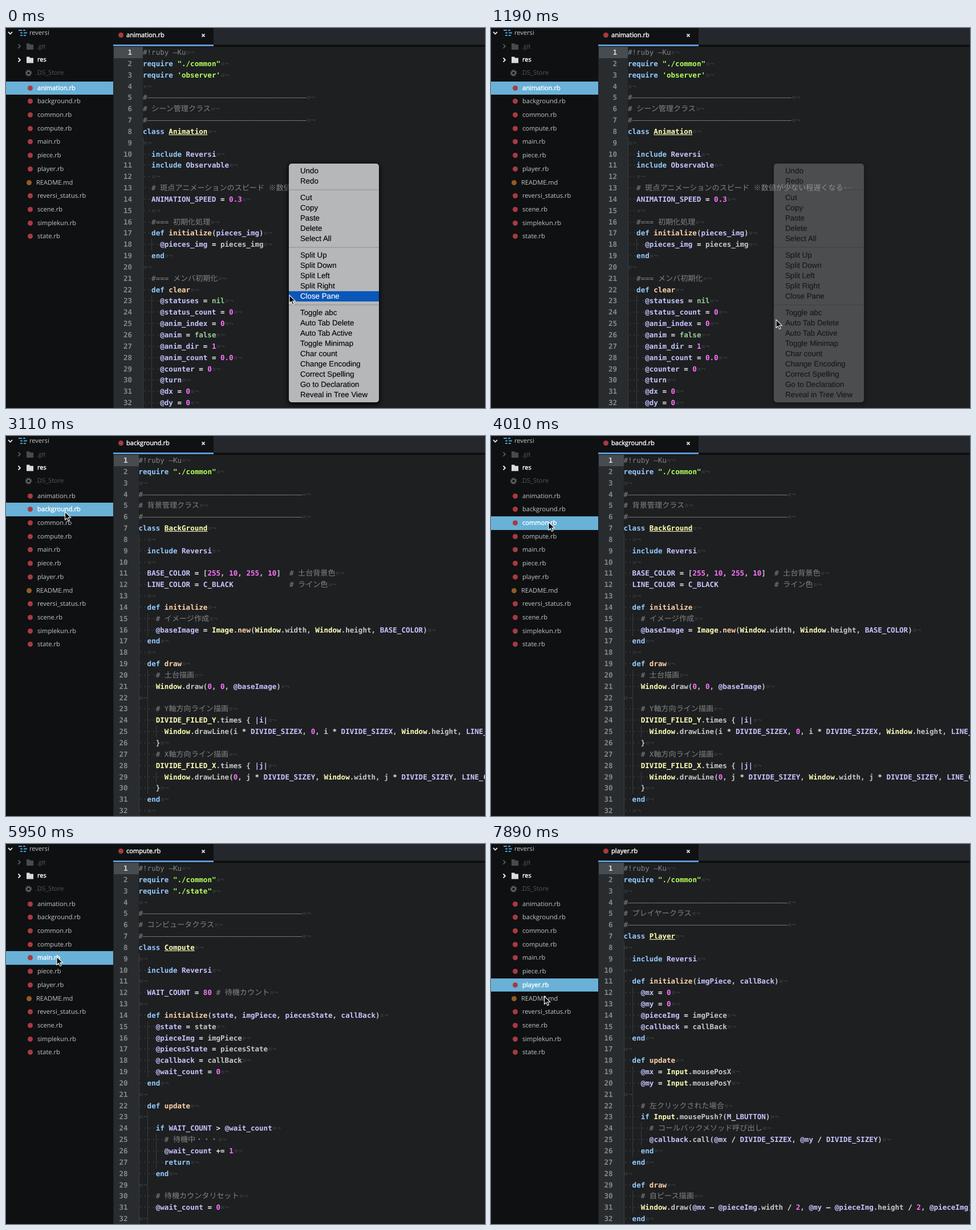
An HTML page that plays this animation: 840x667 px, repeating every 8 s.

```html
<!DOCTYPE html>
<html lang="ja">
<head>
<meta charset="utf-8">
<title>reversi</title>
<style>
html, body { margin: 0; width: 100%; height: 100%; overflow: hidden; background: #1d1f21; text-rendering: geometricPrecision; }
#stage { position: relative; width: 840px; height: 667px; overflow: hidden; font: 11.1px/24px "Open Sans", "Noto Sans", sans-serif; color: #c4c6c8; }
#stage div, #stage svg { position: absolute; }
#tree { left: 0; top: 0; width: 188px; height: 667px; background: #0f1012; }
#highlight { left: 0; width: 188px; height: 23.5px; background: #69b1d6; }
.label { white-space: pre; }
.strong { color: #fff; -webkit-text-stroke: .4px #fff; }
.dim { color: #54575a; }
#bar { left: 188px; top: 0; width: 652px; height: 33px; background: linear-gradient(#24282c 29px, #0c0d0e 30px); }
#tab { left: 0; top: 0; width: 176px; height: 29px; background: #101113; border-bottom: 3.5px solid #5b9bd5; }
.dot { width: 9px; height: 9px; border-radius: 50%; background: #a83a40; }
.page { left: 0; top: 0; width: 840px; height: 667px; }
.gutter { left: 189px; top: 33px; height: 634px; background: #282c2f; }
.current { left: 0; top: 0; width: 100%; height: 20px; background: #474c50; }
.row { height: 19.84px; white-space: pre; font: bold 12.55px/19.84px "DejaVu Sans Mono", monospace; color: #c5c8c6; }
.row span, .row s { position: relative; }
.row .num { position: absolute; right: 100%; margin-right: 19px; color: #85898c; }
.first .num { color: #d5d8da; }
.guide { left: 0; top: 0; height: 20px; background: repeating-linear-gradient(90deg, #3a3d40 0 1px, transparent 1px 15.11px); }
.row s { color: #404346; font-weight: normal; text-decoration: none; }
.row i { font: 13.1px/0 "Noto Sans CJK JP", "Noto Sans CJK", sans-serif; }
.comment { color: #838383; font-weight: normal; }
.string { color: #b4ff5c; }
.key { color: #96cbfe; }
.bool { color: #99cc99; }
.digits { color: #ff73fd; }
.name { color: #ffffb6; text-decoration: underline; }
.func { color: #ffd2a7; }
.type { color: #ffffb6; }
.var { color: #c6c5fe; }
.op { color: #ededed; }
.fold { left: 228.5px; width: 3.5px; height: 3.5px; border: solid #85898c; border-width: 0 1.5px 1.5px 0; transform: rotate(45deg); }
#caret { left: 240px; top: 33px; width: 1px; height: 20px; background: #fff; }
#menu { left: 496px; top: 238px; width: 158px; height: 419px; border-radius: 5px; background: #b5b7b9; box-shadow: 0 2px 6px 2px #08090a; font: 13.3px/18px "Liberation Sans", Arial, sans-serif; color: #050505; -webkit-text-stroke: .15px; }
#menu div { left: 0; width: 138px; height: 18px; padding-left: 20px; white-space: pre; }
#menu .line { width: 158px; height: 2px; padding: 0; background: #a0a2a4; }
#menu .active { background: #0957b9; color: #fff; }
</style>
</head>
<body>
<div id="stage">
  <div id="tree">
    <div id="highlight"></div>
    <svg width="188" height="90" fill="none" stroke-width="1.8">
      <path d="M4 7l3.5 3.5L11 7" stroke="#ddd"/>
      <path d="M22 4h6m2 0h4M25 8.500h4m2 0h6M25 13h4m2 0h4" stroke="#4d9dcc"/>
      <path d="M21.500 28.500l3.500 3.500l-3.500 3.500" stroke="#54575a"/>
      <path d="M21.500 52.500l3.500 3.500l-3.500 3.500" stroke="#eee"/>
      <path d="M36 27h5l1.500 2H48v9H36z" fill="#484b4e"/>
      <path d="M36 50.500h5l1.500 2H48v9H36z" fill="#d8dadc"/>
      <circle cx="39.500" cy="79" r="3.300" stroke="#5a5d60" stroke-width="2.400"/>
      <circle cx="39.500" cy="79" r="5" stroke="#5a5d60" stroke-dasharray="2 1.930"/>
    </svg>
    <div class="label" style="left:41px;top:-3px">reversi</div>
    <div class="label dim" style="left:54px;top:20.5px">.git</div>
    <div class="label strong" style="left:55px;top:44px">res</div>
    <div class="label dim" style="left:52px;top:66.5px">.DS_Store</div>
  </div>
  <div id="bar"><div id="tab">
    <div class="dot" style="left:9px;top:8px"></div>
    <div id="title" class="label strong" style="left:23px;top:.5px"></div>
    <svg style="left:154px;top:9px" width="8" height="8"><path d="M1.500 1.500l5 5m0-5l-5 5" stroke="#d0d2d4" stroke-width="1.800"/></svg>
  </div></div>
  <div id="pages"></div>
  <div id="folds"></div>
  <div id="caret"></div>
  <div id="menu"></div>
  <svg id="pointer" width="14" height="20" style="left:0;top:0"><path d="M1 1V15.200L4.300 12.100L6.500 17.400L8.900 16.400L6.700 11.200H11.200Z" fill="#000" stroke="#fff" stroke-width="1.100"/></svg>
</div>
<script>
const $ = id => document.getElementById(id);
const ROW = 19.84, CELL = 7.555, FILE = 23.7, FILES_TOP = 93.6;

const files = ['animation.rb', 'background.rb', 'common.rb', 'compute.rb', 'main.rb', 'piece.rb',
  'player.rb', 'README.md', 'reversi_status.rb', 'scene.rb', 'simplekun.rb', 'state.rb'];

// "#--" stands for a full-width comment rule.
const pages = [
  { file: 0, code: `#!ruby -Ku
require "./common"
require 'observer'

#--
# シーン管理クラス
#--
class Animation

  include Reversi
  include Observable
  
  # 斑点アニメーションのスピード ※数値が少ない程遅くなる
  ANIMATION_SPEED = 0.3
  
  #=== 初期化処理
  def initialize(pieces_img)
    @pieces_img = pieces_img
  end

  #=== メンバ初期化
  def clear
    @statuses = nil
    @status_count = 0
    @anim_index = 0
    @anim = false
    @anim_dir = 1
    @anim_count = 0.0
    @counter = 0
    @turn
    @dx = 0
    @dy = 0` },
  { file: 1, code: `#!ruby -Ku
require "./common"

#--
# 背景管理クラス
#--
class BackGround
  
  include Reversi
  
  BASE_COLOR = [255, 10, 255, 10]  # 土台背景色
  LINE_COLOR = C_BLACK             # ライン色
  
  def initialize
    # イメージ作成
    @baseImage = Image.new(Window.width, Window.height, BASE_COLOR)
  end
  
  def draw
    # 土台描画
    Window.draw(0, 0, @baseImage)

    # Y軸方向ライン描画
    DIVIDE_FILED_Y.times { |i|
      Window.drawLine(i * DIVIDE_SIZEX, 0, i * DIVIDE_SIZEX, Window.height, LINE_COLOR)
    }
    # X軸方向ライン描画
    DIVIDE_FILED_X.times { |j|
      Window.drawLine(0, j * DIVIDE_SIZEY, Window.width, j * DIVIDE_SIZEY, LINE_COLOR)
    }
  end
  ` },
  { file: 2, last: 23, code: `#!ruby -Ku
require 'dxruby'

#--
# 共通定義
#--
module Reversi

  DIVIDE_FILED_X = 8
  DIVIDE_FILED_Y = 8

  PIECE_NONE = 9
  PIECE_WHITE = 4
  PIECE_BLACK = 0

  DIVIDE_SIZEX = Window.width / DIVIDE_FILED_X
  DIVIDE_SIZEY = Window.height / DIVIDE_FILED_Y

  # use : true, not use : false
  USE_ANIMATION = true

end` },
  { file: 3, code: `#!ruby -Ku
require "./common"
require "./state"

#--
# コンピュータクラス
#--
class Compute

  include Reversi

  WAIT_COUNT = 80 # 待機カウント

  def initialize(state, imgPiece, piecesState, callBack)
    @state = state
    @pieceImg = imgPiece
    @piecesState = piecesState
    @callback = callBack
    @wait_count = 0
  end

  def update

    if WAIT_COUNT > @wait_count
      # 待機中・・・
      @wait_count += 1
      return
    end

    # 待機カウンタリセット
    @wait_count = 0
` },
  { file: 4, code: `#!ruby -Ku
require 'dxruby'
require "./common"
require "./scene"

#--
# メインクラス
#--
class Main

  include Reversi

  def initialize
    # シーン作成
    @scene = Scene.new
    @count = 0
  end

  def update
    @scene.update
    @count += 1
  end

  def draw
    @scene.draw
  end

  # メインループ
  def run
    Window.loop do
      update
      draw
    end` },
  { file: 6, code: `#!ruby -Ku
require "./common"

#--
# プレイヤークラス
#--
class Player

  include Reversi

  def initialize(imgPiece, callBack)
    @mx = 0
    @my = 0
    @pieceImg = imgPiece
    @callback = callBack
  end

  def update
    @mx = Input.mousePosX
    @my = Input.mousePosY

    # 左クリックされた場合
    if Input.mousePush?(M_LBUTTON)
      # コールバックメソッド呼び出し
      @callback.call(@mx / DIVIDE_SIZEX, @my / DIVIDE_SIZEY)
    end
  end

  def draw
    # 自ピース描画
    Window.draw(@mx - @pieceImg.width / 2, @my - @pieceImg.height / 2, @pieceImg)
  end` }
];

const token = new RegExp([
  '(?<comment>#.*)',
  `(?<string>"[^"]*"|'[^']*')`,
  '(?<key>\\b(?:require|class|module|include|def|end|if|return|do)\\b)',
  '(?<bool>\\b(?:nil|true|false)\\b)',
  '(?<digits>\\b\\d[\\d.]*)',
  '(?<name>(?<=class |module )\\w+)',
  '(?<func>(?<=def |Image\\.)\\w+)',
  '(?<type>\\b[A-Z]\\w*(?=\\.))',
  '(?<var>@\\w+|\\b[A-Z]\\w*|\\|\\w+\\||(?<=def .*)\\b\\w+)',
  '(?<op>[=*/+>–])'
].join('|'), 'g');

function paint(text) {
  return text.replace(/-/g, '–').replace(token, (word, ...rest) => {
    const groups = rest.at(-1);
    const kind = Object.keys(groups).find(k => groups[k] !== undefined);
    return `<span class="${kind}">${word}</span>`;
  }).replace(/[※\u3000-\u9fff]+/g, '<i>$&</i>');
}

const indentOf = line => line === undefined ? 0 : line.match(/^ */)[0].length;

function renderLine(line, i, lines) {
  const indent = indentOf(line);
  const depth = line ? indent : Math.max(indentOf(lines[i - 1]), indentOf(lines[i + 1]));
  const text = line === '#--' ? '#' + '-'.repeat(37) : line.slice(indent);
  return `<div class="guide" style="width:${depth * CELL}px"></div>` +
    `<s>${'·'.repeat(indent)}</s>${paint(text)}<s>¤¬</s>`;
}

function renderPage({ file, code, last }) {
  const left = file ? 232.5 : 240;
  const lines = code.split('\n').map(renderLine);
  if (last) lines.push('');
  const rows = lines.map((html, i) =>
    `<div class="row${i ? '' : ' first'}" style="left:${left}px;top:${33 + i * ROW}px">` +
    `<span class="num">${i + 1}</span>${html}</div>`);
  return `<div class="page"><div class="gutter" style="width:${left - 189}px"><div class="current"></div></div>${rows.join('')}</div>`;
}

$('pages').innerHTML = pages.map(renderPage).join('');
$('folds').innerHTML = [5, 8, 17, 22].map(n =>
  `<div class="fold" style="top:${39 + (n - 1) * ROW}px"></div>`).join('');

$('tree').insertAdjacentHTML('beforeend', files.map((name, i) => {
  const readme = name === 'README.md', y = FILES_TOP + i * FILE;
  return `<div class="dot" style="left:${readme ? 36 : 37.5}px;top:${y + 7}px${readme ? ';background:#8f5c26' : ''}"></div>
    <div class="label file" style="left:${readme ? 53 : 55}px;top:${y}px">${name}</div>`;
}).join(''));

const groups = ['Undo,Redo', 'Cut,Copy,Paste,Delete,Select All',
  'Split Up,Split Down,Split Left,Split Right,Close Pane',
  'Toggle abc,Auto Tab Delete,Auto Tab Active,Toggle Minimap,Char count,Change Encoding,Correct Spelling,Go to Declaration,Reveal in Tree View'];
let menuY = 3.5;
$('menu').innerHTML = groups.map((group, i) => {
  let html = '';
  if (i) {
    html = `<div class="line" style="top:${menuY + 5}px"></div>`;
    menuY += 11;
  }
  for (const item of group.split(',')) {
    html += `<div class="item" style="top:${menuY}px">${item}</div>`;
    menuY += 18;
  }
  return html;
}).join('');

// Each table holds [start in ms, value...].
const LOOP = 8000;
const pointerSteps = [
  [0, 496, 468], [150, 497, 475], [290, 498, 488], [440, 499, 502], [590, 499, 511],
  [1340, 488, 498], [1490, 390, 405], [1640, 240, 266], [1780, 175, 212], [1920, 145, 178],
  [2070, 122, 156], [2210, 110, 144], [2360, 106, 140], [2510, 104, 135], [2660, 102.5, 132],
  [3410, 102, 137], [3560, 101, 145], [3710, 100, 150], [4460, 100, 165], [4610, 99, 178],
  [5350, 94, 189], [5500, 88, 197], [6550, 87, 218], [6700, 92, 235], [7740, 92, 252], [7890, 92.5, 266]
];
const itemSteps = [[0, 'Close Pane'], [290, ''], [440, 'Toggle abc'], [590, 'Auto Tab Delete'], [1190, '']];
const menuSteps = [[0, 1], [1190, .3], [1340, 0]];
const fileSteps = [[0, 0], [2810, 1], [4010, 2], [4910, 3], [5950, 4], [7150, 6]];
const focusSteps = [[0, 1], [1340, 0], [2810, 1]];
const pageSteps = [[0, 0], [3110, 1], [4160, 2], [5060, 3], [6100, 4], [7300, 5]];
const foldSteps = [[0, 0], [1640, 1], [1920, 0]];
const caretSteps = [[0, 0], [1340, 1], [1640, 0], [2070, 1], [2510, 0]];

const at = (steps, t) => steps.findLast(step => step[0] <= t).slice(1);
const pageNodes = [...document.querySelectorAll('.page')];
const fileNodes = [...document.querySelectorAll('.file')];
const itemNodes = [...document.querySelectorAll('.item')];

function draw(now) {
  const t = now % LOOP;
  const [x, y] = at(pointerSteps, t), [item] = at(itemSteps, t);
  const [file] = at(fileSteps, t), [page] = at(pageSteps, t);
  $('pointer').style.transform = `translate(${x}px, ${y}px)`;
  $('menu').style.opacity = at(menuSteps, t)[0];
  $('highlight').style.top = FILES_TOP + file * FILE + 'px';
  $('highlight').style.opacity = at(focusSteps, t)[0];
  $('folds').style.opacity = at(foldSteps, t)[0];
  $('caret').style.opacity = at(caretSteps, t)[0];
  $('title').textContent = files[pages[page].file];
  pageNodes.forEach((node, i) => { node.style.display = i === page ? '' : 'none'; });
  fileNodes.forEach((node, i) => node.classList.toggle('strong', i === file));
  itemNodes.forEach(node => node.classList.toggle('active', node.textContent === item));
}

const start = performance.now();
function tick() {
  draw(performance.now() - start);
  requestAnimationFrame(tick);
}
tick();
</script>
</body>
</html>
```
